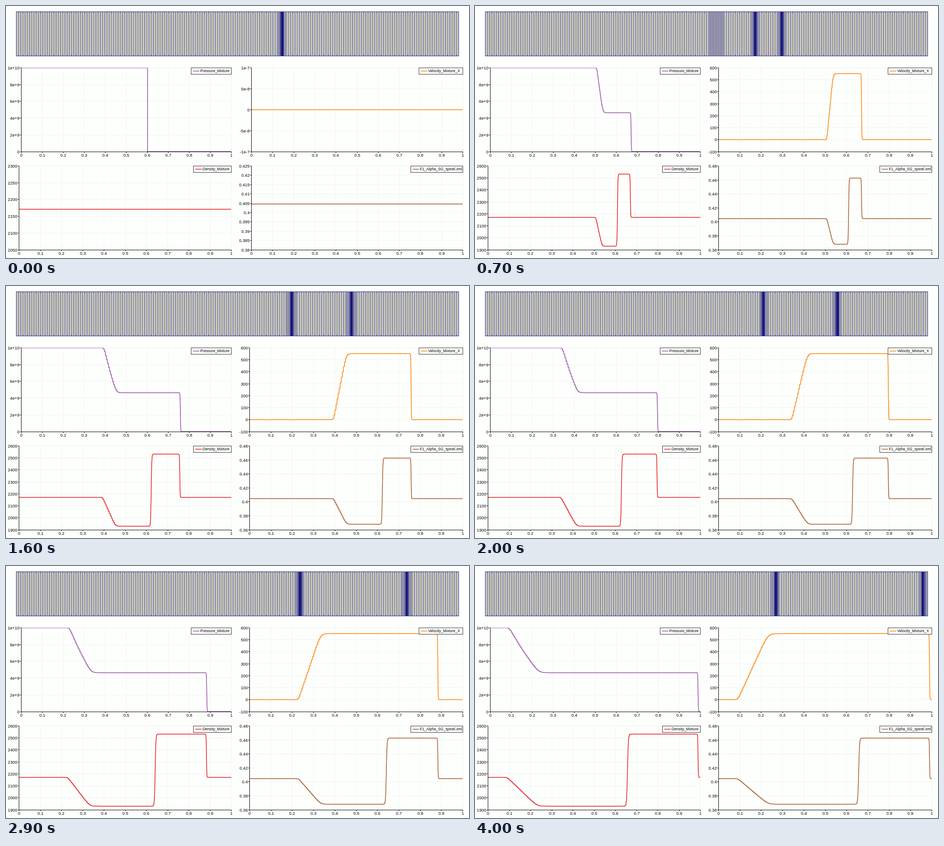
Write an HTML page with a canvas that moves like this. It is 1014x552 px and loops after 4.1 s.

```html
<!DOCTYPE html>
<html lang="en">
<head>
<meta charset="utf-8">
<title>Shock tube</title>
<style>
  html, body { margin: 0; width: 100%; height: 100%; overflow: hidden; background: #fdfffd; }
  canvas { display: block; width: 1014px; height: 552px; }
</style>
</head>
<body>
<canvas id="stage" width="1014" height="552"></canvas>
<script>
const ctx = document.getElementById('stage').getContext('2d');
const STEP_MS = 100, STEPS = 41, CELLS = 200;
const MESH = { left: 22.5, right: 991.5, top: 12.5, bottom: 109.5 };

const softplus = (x, k) => x / k > 30 ? x : k * Math.log1p(Math.exp(x / k));
const sigmoid = x => 1 / (1 + Math.exp(-x));

// Wave positions and shapes after n steps, with x from 0 to 1.
function waves(n) {
  const contact = 0.5997 + 0.00143 * n;
  const shock = 0.6028 + 0.00966 * n;
  const fan = 0.599 - 0.01095 * n;
  const half = 0.003 + 0.0017 * n;
  const headSoft = 0.001 + 0.00007 * n, tailSoft = 0.0015 + 0.0002 * n;
  return {
    contact, shock, fan, half,
    expand: x => (softplus(x - fan + half, headSoft) - softplus(x - fan - half, tailSoft)) / (2 * half),
    touch: x => sigmoid((x - contact) / (0.0009 + 0.00003 * n)),
    jump: x => sigmoid((x - shock) / 0.0008)
  };
}

function refinement(x, n, w) {
  const d = n ? Math.min(Math.abs(x - w.contact), Math.abs(x - w.shock)) : Math.abs(x - 0.601);
  let level = d < 0.0026 ? 4 : d < 0.0052 ? 2 : d < 0.0105 ? 1 : 0;
  if (n && Math.abs(x - w.fan) < w.half + 0.002)
    level = Math.max(level, n < 3 ? 3 : n < 7 ? 2 : n < 14 ? 1 : 0);
  return level;
}

// Cells near the waves are halved repeatedly; deeper levels lie closer to a wave.
function buildCells(n, w) {
  const cells = [];
  function split(x, size, level) {
    if (level < refinement(x + size / 2, n, w)) {
      split(x, size / 2, level + 1);
      split(x + size / 2, size / 2, level + 1);
    } else cells.push({ x, size, level });
  }
  for (let i = 0; i < CELLS; i++) split(i / CELLS, 1 / CELLS, 0);
  return cells;
}

function line(x1, y1, x2, y2, color, width = 1) {
  ctx.strokeStyle = color;
  ctx.lineWidth = width;
  ctx.beginPath();
  ctx.moveTo(x1, y1);
  ctx.lineTo(x2, y2);
  ctx.stroke();
}

const snap = v => Math.floor(v) + 0.5;

function drawMesh(cells) {
  const { left, right, top, bottom } = MESH;
  ctx.fillStyle = '#c8c8be';
  ctx.fillRect(left, top, right - left, bottom - top);
  for (const c of cells) {
    const x = left + c.x * (right - left);
    const plain = !c.level && Math.round(c.x * CELLS) % 2;
    line(x, top, x, bottom, c.level ? '#14147c' : plain ? '#66666f' : '#4a4aa0', c.level ? 0.75 : 1);
    if (plain) {
      line(x, top, x, top + 3, '#24247c');
      line(x, bottom - 3, x, bottom, '#24247c');
    }
  }
  ctx.strokeStyle = '#3030a0';
  ctx.lineWidth = 1;
  ctx.strokeRect(left, top, right - left, bottom - top);
}

const charts = [
  { name: 'Pressure_Mixture', color: '#984ea3', left: 33, right: 493.5, top: 135.5, box: 405.5,
    range: () => [0, 1e10, 2e9],
    value(x, n, w) {
      if (!n) return x < 0.601 ? 1e10 : 0;
      const s = w.expand(x);
      return (1e10 - 5.35e9 * s * (1.16 - 0.16 * s)) * (1 - w.jump(x));
    } },
  { name: 'Velocity_Mixture_X', color: '#ff7f00', left: 533, startLeft: 537, right: 1000.5, top: 135.5, box: 904.5,
    range: n => n ? [-100, 600, 100] : [-1e-7, 1e-7, 5e-8],
    value: (x, n, w) => n ? 552 * w.expand(x) * (1 - w.jump(x)) : 0 },
  { name: 'Density_Mixture', color: '#e41a1c', left: 28, right: 493.5, top: 350.5, box: 410.5,
    range: n => n ? [1900, 2600, 100] : [2050, 2300, 50],
    value: (x, n, w) => n ? 2171 - 241 * w.expand(x) + 602 * w.touch(x) - 361 * w.jump(x) : 2171 },
  { name: 'F1_Alpha_SG_spinel.xml', color: '#a65628', left: 533, startLeft: 537, right: 1000.5, top: 350.5, box: 886.5,
    range: n => n ? [0.36, 0.48, 0.02] : [0.38, 0.425, 0.005],
    value: (x, n, w) => n ? 0.4046 - 0.0366 * w.expand(x) + 0.0947 * w.touch(x) - 0.0581 * w.jump(x) : 0.4046 }
];
const CHART_HEIGHT = 183.5;

function text(s, x, y, align, size) {
  ctx.font = size + 'px "Liberation Sans", Arial, sans-serif';
  ctx.textAlign = align;
  ctx.textBaseline = 'middle';
  ctx.fillStyle = '#000';
  ctx.fillText(s, x, y);
}

function label(v) {
  const size = Math.abs(v);
  return size >= 1e9 || (size && size < 1e-6) ? v.toExponential() : String(v);
}

function drawChart(chart, n, w, cells) {
  const { right, top, color } = chart;
  const left = (n ? chart.left : chart.startLeft || chart.left) + 0.5;
  const bottom = top + CHART_HEIGHT;
  const [min, max, step] = chart.range(n);
  const px = x => left + x * (right - left);
  const py = v => bottom - (v - min) / (max - min) * CHART_HEIGHT;
  const rows = Math.round((max - min) / step);

  for (let i = 0; i <= 10; i++) {
    const x = snap(px(i / 10));
    if (i) line(x, top, x, bottom, '#f2f4f2');
    line(x, bottom, x, bottom + 3, '#000');
    text(String(i / 10), x, bottom + 8.5, 'center', 9.2);
  }
  for (let i = 0; i <= rows; i++) {
    const v = +(min + i * step).toPrecision(6), y = snap(py(v));
    if (i) line(left, y, right, y, '#f2f4f2');
    line(left - 3, y, left, y, '#000');
    text(label(v), left - 4, y + 0.5, 'right', 9.2);
  }
  line(left, top, left, bottom, '#000');
  line(left, snap(bottom), right, snap(bottom), '#000');

  ctx.save();
  ctx.beginPath();
  ctx.rect(left, top, right - left, CHART_HEIGHT);
  ctx.clip();
  ctx.beginPath();
  for (const c of cells) {
    const y = py(chart.value(c.x + c.size / 2, n, w));
    const inset = Math.min(0.0005, c.size / 4);
    ctx.lineTo(px(c.x + inset), y);
    ctx.lineTo(px(c.x + c.size - inset), y);
  }
  ctx.strokeStyle = color;
  ctx.lineWidth = 1.5;
  ctx.lineJoin = 'round';
  ctx.stroke();
  ctx.restore();

  ctx.fillStyle = '#fdfffd';
  ctx.fillRect(chart.box, top, right - chart.box, 14);
  ctx.strokeStyle = '#333';
  ctx.lineWidth = 1;
  ctx.strokeRect(chart.box, top, right - chart.box, 14);
  line(chart.box + 4, top + 7, chart.box + 18, top + 7, color, 1.5);
  text(chart.name, chart.box + 20, top + 7.3, 'left', 8.2);
}

function draw(n) {
  const w = waves(n), cells = buildCells(n, w);
  ctx.fillStyle = '#fdfffd';
  ctx.fillRect(0, 0, 1014, 552);
  drawMesh(cells);
  for (const chart of charts) drawChart(chart, n, w, cells);
}

let shown = -1;
function tick() {
  const n = Math.floor(performance.now() / STEP_MS) % STEPS;
  if (n !== shown) draw(shown = n);
  requestAnimationFrame(tick);
}
tick();
</script>
</body>
</html>
```
